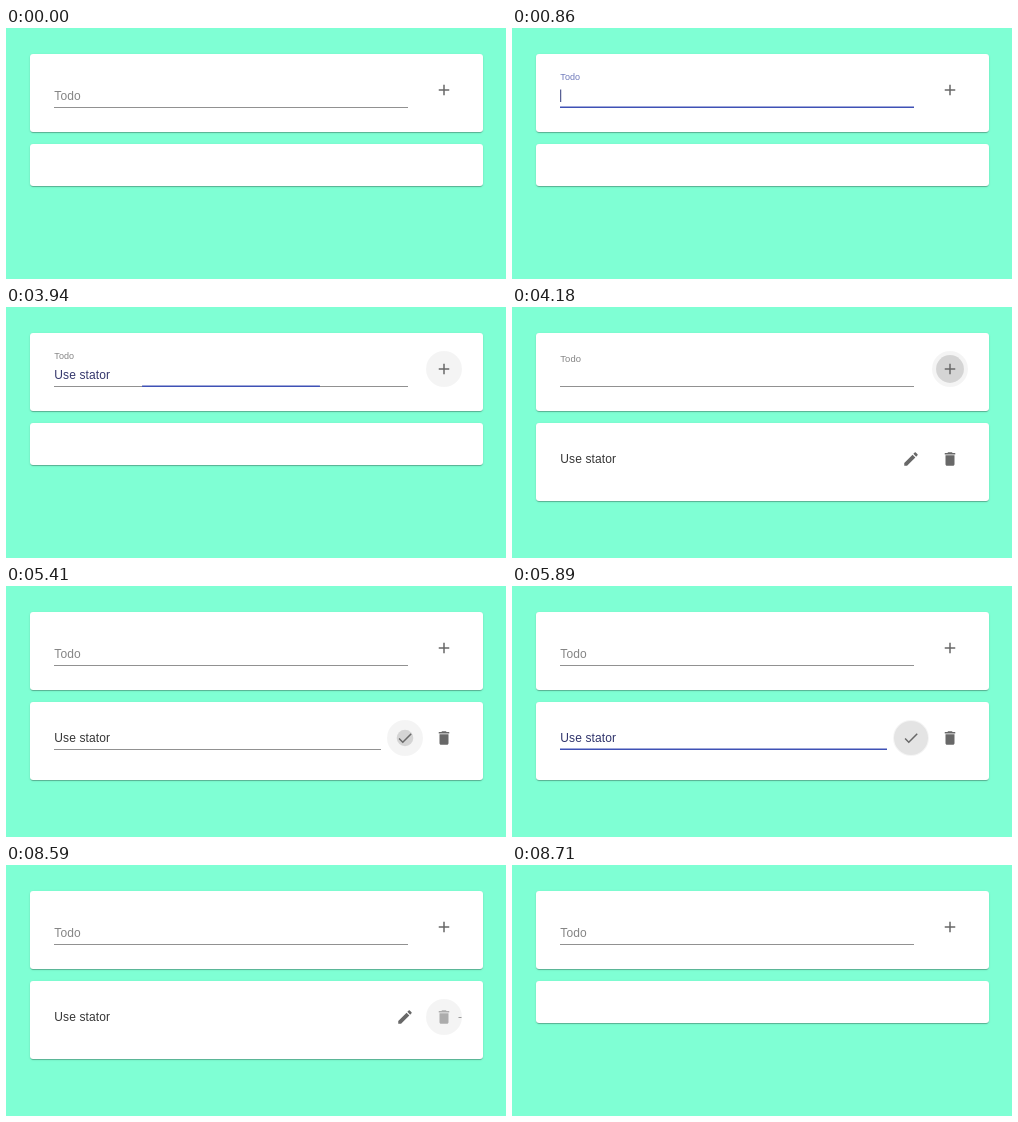
Write an HTML page that moves like this. It is 500 px wide and 251 px high and loops after 9.96 s.

```html
<!DOCTYPE html>
<html lang="en">
<head>
<meta charset="utf-8">
<title>Todo list</title>
<style>
  html, body { margin: 0; width: 100%; height: 100%; overflow: hidden; background: #7fffd4; }
  .card {
    position: absolute; left: 24px; width: 453px; background: #fff; border-radius: 3px;
    box-shadow: 0 1.5px .75px -.75px rgba(0,0,0,.2), 0 .75px .75px rgba(0,0,0,.14), 0 .75px 2.25px rgba(0,0,0,.12);
  }
  #form { top: 26px; height: 78px; }
  #list { top: 116px; height: 42px; }
  svg { position: absolute; left: 0; top: 0; }
  text { font: 12px "Liberation Sans", Arial, sans-serif; letter-spacing: .00938em; white-space: pre; }
  .rule { fill: #919191; }
  .bar { fill: #3f51b5; }
  .caret { fill: #303a7a; }
  .icon { fill: #686868; }
  .hover { fill: #000; fill-opacity: .043; }
  .ripple { fill: #000; }
</style>
</head>
<body>
<div class="card" id="form"></div>
<div class="card" id="list"></div>
<svg width="500" height="251" viewBox="0 0 500 251">
  <defs>
    <path id="add" d="M19 13h-6v6h-2v-6H5v-2h6V5h2v6h6v2z"/>
    <path id="check" d="M9 16.17L4.83 12l-1.42 1.41L9 19 21 7l-1.41-1.41z"/>
    <path id="edit" d="M3 17.25V21h3.75L17.81 9.94l-3.75-3.75L3 17.25zM20.71 7.04c.39-.39.39-1.02 0-1.41l-2.34-2.34c-.39-.39-1.02-.39-1.41 0l-1.83 1.83 3.75 3.75 1.83-1.83z"/>
    <path id="trash" d="M6 19c0 1.1.9 2 2 2h8c1.1 0 2-.9 2-2V7H6v12zM19 4h-3.5l-1-1h-5l-1 1H5v2h14V4z"/>
  </defs>

  <rect class="rule" id="rule" x="48" y="79" width="354" height="1"/>
  <rect class="bar" id="bar" y="78.5" height="1.5"/>
  <text id="label">Todo</text>
  <text id="input" x="48.3" y="72"></text>
  <rect class="caret" id="caret" y="61.5" width="1" height="12.5"/>
  <circle class="hover" id="addHover" cx="438" cy="62" r="18"/>
  <circle class="ripple" id="addRipple" cx="438" cy="62"/>
  <use class="icon" href="#add" transform="translate(429 53) scale(.75)"/>

  <g id="item">
    <g id="field">
      <rect class="rule" x="48" y="163" width="327" height="1"/>
      <rect class="bar" id="itemBar" y="162.5" height="1.5"/>
    </g>
    <text id="itemText" x="48.3" y="156">Use stator</text>
    <rect class="caret" id="itemCaret" y="146" width="1" height="12.5"/>
    <circle class="hover" id="editHover" cx="399" cy="152" r="18"/>
    <circle class="ripple" id="editRipple" cx="399" cy="152"/>
    <use class="icon" id="editIcon" transform="translate(390 143) scale(.75)"/>
    <circle class="hover" id="trashHover" cx="438" cy="152" r="18"/>
    <use class="icon" id="trashIcon" href="#trash" transform="translate(429 143) scale(.75)"/>
    <rect id="dash" x="452.5" y="152" width="3" height="1" fill="#999"/>
  </g>
</svg>
<script>
const LOOP = 9960, TEXT = 'Use stator';
const $ = id => document.getElementById(id);

// The picture is held between these moments: [first, last] in 120 ms steps.
const runs = [[0, 0], [500, 860], [1230, 1350], [1720, 1720], [1970, 2330], [2580, 2580],
  [3200, 3200], [3700, 4420], [5170, 5170], [5410, 6130], [6500, 6500], [6870, 7110],
  [7360, 7480], [7850, 8090], [8590, 8710]];
const hold = now => {
  const [a, b] = runs.filter(r => r[0] <= now).pop();
  return Math.min(b, a + Math.floor((now - a) / 120) * 120);
};

// [time, letters typed]
const keys = [[0, 0], [1350, 1], [1720, 3], [1970, 5], [2090, 6], [2210, 7], [2330, 8], [2580, 10], [4180, 0]];

const clamp = v => Math.max(0, Math.min(1, v));
const ease = (t, start, length = 200) => 1 - (1 - clamp((t - start) / length)) ** 3;
const within = (t, a, b) => t >= a && t < b;
const show = (id, on) => { $(id).style.display = on ? '' : 'none'; };
const set = (id, attrs) => { for (const k in attrs) $(id).setAttribute(k, attrs[k]); };

function bar(id, width, scale) {
  set(id, { x: 48 + width * (1 - scale) / 2, width: width * scale });
}

function ripple(id, t, start, release, end) {
  const fade = 1 - clamp((t - release) / (end - release));
  set(id, { r: 17 * ease(t, start, 550), 'fill-opacity': .13 * fade });
  show(id, within(t, start, end));
}

function caret(id, textId, on) {
  const width = $(textId).textContent ? $(textId).getComputedTextLength() : 0;
  set(id, { x: 48.2 + width });
  show(id, on);
}

function drawForm(t) {
  const focused = within(t, 600, 3899);
  const near = within(t, 500, 620);
  set('rule', { y: near ? 78.5 : 79, height: near ? 1.5 : 1 });
  $('rule').style.fill = near ? '#555' : '';
  bar('bar', 354, ease(t, 600) - ease(t, 3899));

  const lift = ease(t, 600) - ease(t, 4170);
  set('label', {
    transform: `translate(48.3 ${72 - 20 * lift}) scale(${1 - .25 * lift})`,
    fill: focused ? '#6f7abb' : '#858585'
  });

  $('input').textContent = TEXT.slice(0, keys.filter(k => k[0] <= t).pop()[1]);
  set('input', { fill: within(t, 3700, 4180) ? '#34376c' : '#6268a4' });
  caret('caret', 'input', within(t, 620, 1230) || within(t, 1350, 3200) || within(t, 3700, 3899));

  show('addHover', within(t, 3700, 4420));
  ripple('addRipple', t, 3940, 4180, 4420);
}

function drawItem(t) {
  const present = within(t, 4180, 8710);
  const editing = within(t, 5410, 7480);
  $('list').style.height = (present ? 78 : 42) + 'px';
  show('item', present);
  show('field', editing);
  bar('itemBar', 327, ease(t, 5500) - ease(t, 7319));
  set('itemText', { fill: within(t, 5530, 7480) ? '#30346c' : '#363636' });
  caret('itemCaret', 'itemText', within(t, 6010, 6500) || within(t, 6990, 7360));

  set('editIcon', { href: editing ? '#check' : '#edit' });
  show('editHover', within(t, 5170, 7850));
  ripple('editRipple', t, t < 7000 ? 5300 : 7200, t < 7000 ? 5650 : 7400, t < 7000 ? 6130 : 7850);

  const pressed = t >= 8590;
  show('trashHover', t >= 8090);
  $('trashIcon').style.fill = pressed ? '#acacac' : '';
  show('dash', pressed);
}

let origin;
function tick(now) {
  origin ??= now;
  const t = hold((now - origin) % LOOP);
  drawForm(t);
  drawItem(t);
  requestAnimationFrame(tick);
}
requestAnimationFrame(tick);
</script>
</body>
</html>
```
